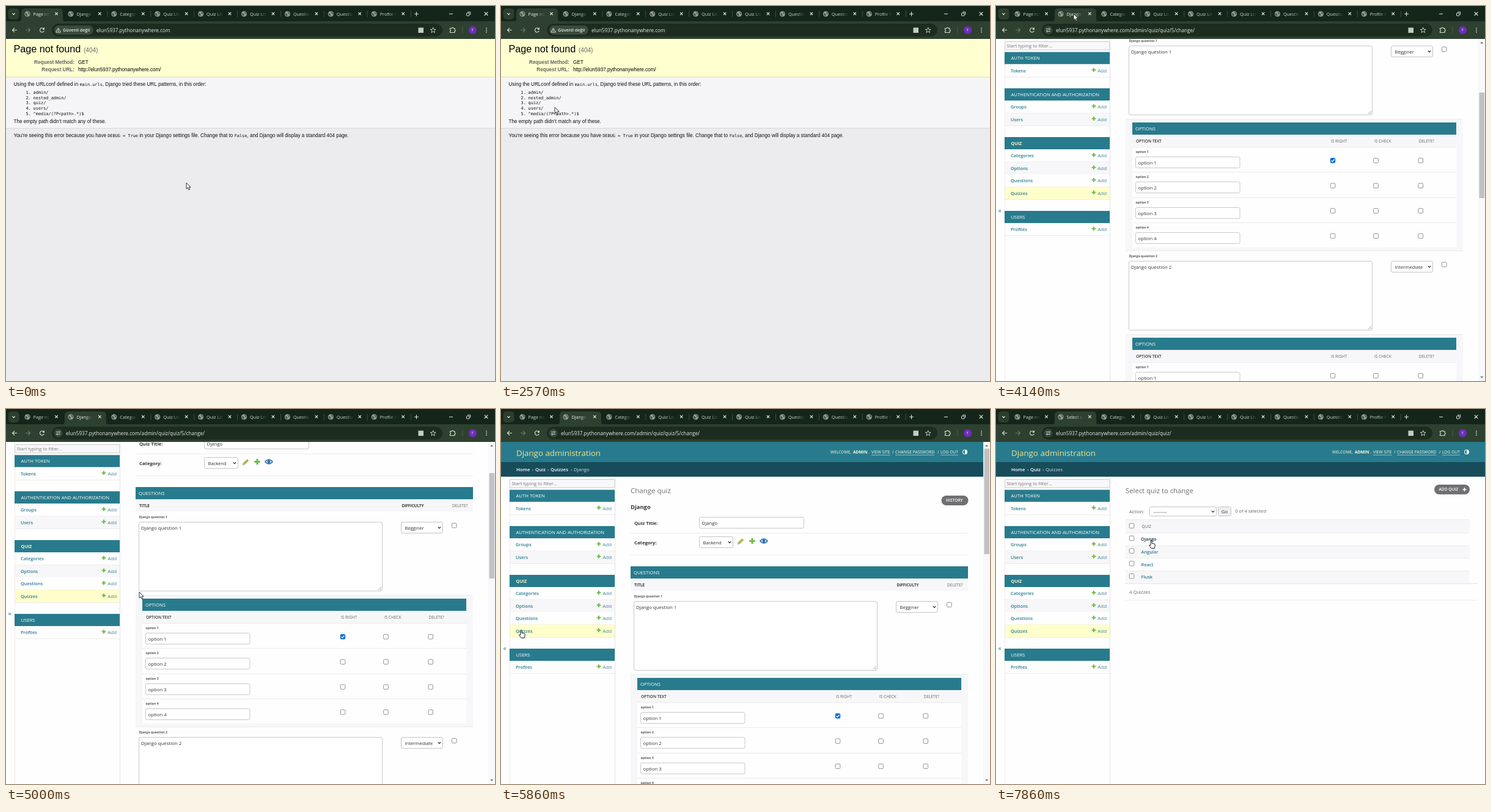
Animation of 800 by 615 pixels, one loop 8000 ms. Source, as an HTML page with a canvas:

```html
<!DOCTYPE html>
<html lang="tr">
<head>
<meta charset="utf-8">
<style>
  html, body { margin: 0; width: 100%; height: 100%; overflow: hidden; background: #fff; }
  canvas { display: block; }
</style>
</head>
<body>
<canvas id="stage" width="800" height="615"></canvas>
<script>
const ctx = document.getElementById('stage').getContext('2d');
const UI = '"Open Sans", "Noto Sans", sans-serif';
const ARIAL = '"Liberation Sans", Arial, sans-serif';
const MONO = '"DejaVu Sans Mono", monospace';
const HOST = 'elun5937.pythonanywhere.com';
const TEAL = '#287b8d', DARK = '#174c5a', LINE = '#ececee', SHADE = '#f7f6f8', INK = '#333', GREY = '#666';

const LOOP = 8000, STEP = 1000 / 7;
const OPEN_ADMIN = 27, OPEN_LIST = 44;
const cursorKeys = [
  [0, 295, 290], [1, 295, 288], [4, 297, 120], [7, 298, 48], [10, 298, 48], [13, 240, 110],
  [16, 92, 150], [18, 88, 166], [20, 60, 150], [22, 52, 130], [24, 112, 40], [27, 127, 13],
  [33, 127, 13], [35, 218, 300], [36, 224, 320], [38, 150, 345], [40, 38, 363], [41, 33, 362],
  [43, 33, 362], [46, 250, 430], [48, 420, 486], [49, 418, 482], [53, 264, 232], [54, 254, 215], [55, 254, 215]
];
const scrollKeys = [[0, 250], [33, 250], [35, 130], [36, 19], [38, 0], [56, 0]];

function track(keys, n) {
  const i = Math.max(1, keys.findIndex(k => k[0] >= n));
  const a = keys[i - 1], b = keys[i], p = (n - a[0]) / (b[0] - a[0]);
  return a.slice(1).map((v, j) => v + (b[j + 1] - v) * p);
}

function rect(x, y, w, h, color) {
  ctx.fillStyle = color;
  ctx.fillRect(x, y, w, h);
}
function box(x, y, w, h, r, fill, border, width = 1) {
  ctx.beginPath();
  ctx.roundRect(x, y, w, h, r);
  if (fill) { ctx.fillStyle = fill; ctx.fill(); }
  if (border) { ctx.strokeStyle = border; ctx.lineWidth = width; ctx.stroke(); }
}
function text(str, x, y, size, color = INK, weight = 400, font = UI, align = 'left') {
  ctx.font = `${weight} ${size}px ${font}`;
  ctx.fillStyle = color;
  ctx.textAlign = align;
  ctx.fillText(str, x, y);
  return ctx.measureText(str).width;
}
function disc(x, y, r, color) {
  ctx.beginPath();
  ctx.arc(x, y, r, 0, 7);
  ctx.fillStyle = color;
  ctx.fill();
}
function stroke(path, x, y, color, width = 1.1) {
  ctx.save();
  ctx.translate(x, y);
  ctx.strokeStyle = color;
  ctx.lineWidth = width;
  ctx.stroke(new Path2D(path));
  ctx.restore();
}
function shape(path, x, y, fill, line, width = 0.9) {
  ctx.save();
  ctx.translate(x, y);
  ctx.fillStyle = fill;
  ctx.fill(new Path2D(path));
  ctx.restore();
  if (line) stroke(path, x, y, line, width);
}
const chevron = (x, y, color = '#222') => stroke('M-2.2-1.1L0 1.1 2.2-1.1', x, y, color, 1.2);
const cross = (x, y, r, color) => stroke(`M${-r} ${-r}L${r} ${r}M${r} ${-r}L${-r} ${r}`, x, y, color);
const plus = (x, y, r, color, width) => stroke(`M${-r} 0H${r}M0 ${-r}V${r}`, x, y, color, width);

// Browser window

function globe(x, y) {
  disc(x, y, 4.6, '#929c93');
  shape('M-3.6-1.5Q-1-1 0 .5T-1 3.6Q-4 2-3.6-1.5ZM.5-3.8Q4-2.6 3.6.8 1.4.6.5-3.8Z', x, y, '#4b584c');
}

function tabs(active, listOpen) {
  rect(0, 0, 800, 26, '#14261a');
  box(3.5, 4, 18, 18, 5, '#2c3e2d');
  chevron(12.5, 13, '#e4ebe4');
  const titles = ['Page not found', listOpen ? 'Select quiz' : 'Django | Change', 'Categories', 'Quiz List',
    'Quiz List', 'Quiz List', 'Question', 'Question', 'Profile Page'];
  titles.forEach((title, i) => {
    const x = 25 + i * 70.9;
    if (i === active) {
      shape('M-5 22Q0 22 0 17V6Q0 0 6 0H62Q68 0 68 6V17Q68 22 73 22Z', x, 4, '#2e402f');
    } else if (i !== active - 1) {
      rect(x + 69.5, 8, 1, 10, '#3d5040');
    }
    globe(x + 10, 13);
    const fade = ctx.createLinearGradient(x + 34, 0, x + 47, 0);
    fade.addColorStop(0, i === active ? '#eaf0ea' : '#cbd6cb');
    fade.addColorStop(1, 'rgba(200,215,200,0)');
    text(title, x + 19.5, 15.7, 7.3, fade);
    cross(x + 57.5, 12.7, 2.2, '#dfe7df');
  });
  plus(671.5, 13, 3.4, '#dfe7df', 1.1);
  rect(725, 12.5, 6, 1, '#e4ebe4');
  box(753.5, 11.5, 4.5, 4.5, 0.8, null, '#e4ebe4');
  stroke('M0 0H4.5V4.5', 755.2, 9.8, '#e4ebe4', 0.9);
  cross(785.5, 12.7, 2.8, '#e4ebe4');
}

function toolbar(admin, path, focused, hovered) {
  const light = '#d5dfd5';
  rect(0, 25, 800, 29, '#2e402f');
  stroke('M4 0H-3.5M0-3.5L-3.5 0 0 3.5', 14, 39.5, light);
  stroke('M-4 0H3.5M0-3.5L3.5 0 0 3.5', 36, 39.5, '#6d7d6e');
  stroke('M3-1.8A3.5 3.5 0 1 0 3.3 1.2M3.4-4V-1.4H.8', 59, 39.5, light);
  box(75, 29, 639, 21, 10.5, hovered && !focused ? '#24362a' : '#1c2c1e');
  if (focused) box(75, 28.8, 638.5, 21.2, 10.6, '#24352a', '#a3d9a5', 1.4);

  if (admin) {
    disc(85.5, 39.5, 7, '#35473a');
    stroke('M-3.5-1.8H.2M-3.5 1.8H-2.4M-.2 1.8H3.5', 85.5, 39.5, light, 1);
    stroke('M3 -1.8A1.1 1.1 0 1 1 .8-1.8 1.1 1.1 0 1 1 3-1.8ZM-.4 1.8A1.1 1.1 0 1 1-2.6 1.8 1.1 1.1 0 1 1-.4 1.8Z', 85.5, 39.5, light, 0.9);
    text(HOST + path, 98, 42.6, 8.2, '#e6ece6');
  } else {
    box(79, 32, 64, 15, 7.5, '#3a4b3c');
    stroke('M0-3.6L4 3.2H-4ZM0-1.4V1M0 1.6V2.4', 85.5, 39.8, '#e6ece6', 0.9);
    text('Güvenli değil', 93, 42.3, 7.1, '#e6ece6', 600);
    const width = text(HOST, 148, 42.6, 8.2, '#e6ece6');
    if (focused) rect(148 + width + 0.5, 34, 1, 11, '#e6ece6');
  }
  if (focused) {
    box(596.5, 33, 68, 14, 7, '#174a29');
    disc(605.5, 40, 4, '#a9e6b1');
    text('Dorvil Scan', 614, 42.6, 7.4, '#b8efbf', 600);
  }
  rect(674.5, 35.5, 8.5, 8.5, '#c3cdc3');
  stroke('M0-4.4L1.2-1.3 4.4-1.2 1.9.9 2.7 4 0 2.2-2.7 4-1.9.9-4.4-1.2-1.2-1.3Z', 698.7, 39.6, light, 0.9);
  stroke('M-4-2.8H-1.3A1.3 1.3 0 0 1 1.3-2.8H3.5V-.6A1.3 1.3 0 0 1 3.5 2V4.2H-4V2A1.5 1.5 0 0 0-4-.8Z', 730.5, 39.3, light, 1.1);
  rect(746.5, 34.5, 1, 10, '#4c5f4d');
  disc(763.5, 39.5, 6.6, '#6c2eb9');
  text('E', 763.5, 41.4, 5, '#fff', 400, UI, 'center');
  for (const dy of [-3.2, 0, 3.2]) disc(786, 39.5 + dy, 0.9, light);
}

// Error page

function richLine(x, y, ...parts) {
  parts.forEach((part, i) => {
    x += i % 2 ? text(part, x, y, 6.9, '#111', 400, MONO) : text(part, x, y, 8.13, '#111', 400, ARIAL);
  });
}

function errorPage() {
  rect(0, 54, 800, 561, '#ecebee');
  rect(0, 54, 800, 62, '#ffffcf');
  rect(0, 116, 800, 1, '#dcdcd4');
  rect(0, 117, 800, 83, '#f5f4f7');
  rect(0, 200, 800, 1, '#d9d9da');
  text('Page not found', 12.5, 75.7, 16.2, '#000', 400, ARIAL);
  text('(404)', 127, 75.7, 10, GREY, 400, ARIAL);
  text('Request Method:', 112, 95, 8.13, GREY, 700, ARIAL, 'right');
  text('Request URL:', 112, 107, 8.13, GREY, 700, ARIAL, 'right');
  text('GET', 118, 95, 8.13, '#000', 400, ARIAL);
  text(`http://${HOST}/`, 118, 107, 8.13, '#000', 400, ARIAL);
  richLine(12.5, 130.8, 'Using the URLconf defined in ', 'main.urls', ', Django tried these URL patterns, in this order:');
  ['admin/', 'nested_admin/', 'quiz/', 'users/', '^media/(?P<path>.*)$'].forEach((pattern, i) => {
    text(`${i + 1}.`, 32.6, 144 + i * 8.7, 6.9, '#111', 400, MONO);
    text(pattern, 44.6, 144 + i * 8.7, 6.9, '#111', 400, MONO);
  });
  richLine(12.5, 192, 'The empty path didn’t match any of these.');
  richLine(12.5, 214.5, 'You’re seeing this error because you have ', 'DEBUG = True',
    ' in your Django settings file. Change that to ', 'False', ', and Django will display a standard 404 page.');
}

// Admin pages

function header(right, crumbs) {
  rect(0, 54, 800, 33, TEAL);
  rect(0, 87, 800, 24, DARK);
  text('Django administration', 25, 77, 13.3, '#f3e08a');
  const links = (str, x, weight) => text(str, right + x, 73, 6.7, '#fdf8d8', weight);
  links('WELCOME,', -220);
  links('ADMIN', -183, 700);
  links('.', -157.5);
  [['VIEW SITE', -153], ['CHANGE PASSWORD', -114], ['LOG OUT', -40]].forEach(([label, x]) => {
    const width = links(label, x);
    rect(right + x, 75, width, 0.8, '#a9cbd2');
  });
  links('/', -119);
  links('/', -45);
  disc(right, 70.5, 4, '#fff');
  shape('M0-3A3 3 0 0 0 0 3Z', right, 70.5, TEAL);
  const spots = [25, 56, 81, 119];
  crumbs.forEach((name, i) => {
    const last = i === crumbs.length - 1;
    text(name, spots[i], 102.2, 7.8, last ? '#cfe0e6' : '#fff', last ? 400 : 600);
    if (i) text('›', spots[i] - 5, 102.2, 7.8, '#cfe0e6');
  });
}

function sidebar() {
  rect(0, 111, 187, 620, '#fefefe');
  rect(14, 111, 1, 620, LINE);
  rect(186, 111, 1, 620, '#e3e3e5');
  text('«', 3.5, 395.5, 11, TEAL);
  box(14.5, 115.5, 171.5, 13.5, 1, '#f8f7f9', '#ccc');
  text('Start typing to filter...', 17.5, 125, 7.6, '#757575');
  const modules = [['AUTH TOKEN', 132.5, 'Tokens'], ['AUTHENTICATION AND AUTHORIZATION', 192, 'Groups', 'Users'],
    ['QUIZ', 272, 'Categories', 'Options', 'Questions', 'Quizzes'], ['USERS', 393, 'Profiles']];
  for (const [title, top, ...models] of modules) {
    rect(14, top, 172, 20, TEAL);
    const current = title === 'QUIZ';
    text(title, 24.5, top + 12.9, current ? 7.2 : 7.7, current ? '#fff6c4' : '#fff', current ? 700 : 400);
    models.forEach((model, i) => {
      const y = top + 20 + i * 20.5;
      rect(15, y, 171, 20.5, model === 'Quizzes' ? '#ffffcc' : i % 2 ? SHADE : '#fefefe');
      rect(15, Math.round(y + 20), 171, 1, LINE);
      text(model, 24, y + 13, 7.4, TEAL, 600);
      plus(160, y + 9.3, 3.3, '#6cbd45', 2);
      text('Add', 166.3, y + 13, 8, '#41849a');
    });
  }
}

function checkbox(x, y, checked) {
  box(x - 3.8, y - 3.8, 7.6, 7.6, 1.4, checked ? '#0b6bd0' : '#fff', checked ? '#0b6bd0' : '#77777a', 0.8);
  if (checked) stroke('M-2.4 0L-.7 1.8 2.5-1.9', x, y, '#fff', 1.3);
}
function field(x, y, w, h, value) {
  box(x + 0.5, y + 0.5, w - 1, h - 1, 2.5, '#fff', '#c9c9cb');
  text(value, x + 4.5, y + 12.8, 7.8);
}
function select(x, y, w, h, value) {
  box(x + 0.5, y + 0.5, w - 1, h - 1, 2.5, '#fff', '#c4c4c6');
  text(value, x + 6.5, y + h / 2 + 3, 7.6);
  chevron(x + w - 6, y + h / 2);
}
function bar(label, x, y, w) {
  rect(x, y, w, 20, TEAL);
  text(label, x + 5, y + 12.9, 7.7, '#fff');
}
function pill(label, x, y, w) {
  box(x, y, w, 16, 8, '#706f72');
  text(label, x + 7.5, y + 10.4, 6.6, '#fff', 600);
}

function question(top, number, difficulty, rightOption) {
  const name = `Django question ${number}`;
  text(name, 217.5, top - 6.5, 5.2, '#555', 700);
  field(217, top, 399, 114, '');
  text(name, 221, top + 12.5, 7.8);
  stroke('M0 5L5 0M3 5L5 3', 609, top + 107, '#888', 0.8);
  select(646, top, 69, 19, difficulty);
  checkbox(733.3, top + 6);

  rect(212, top + 120, 552, 217, SHADE);
  rect(212, top + 120, 552, 1, LINE);
  rect(212, top + 336, 552, 1, LINE);
  bar('OPTIONS', 223, top + 126, 530);
  text('OPTION TEXT', 229, top + 158.5, 6.5, INK, 600);
  text('IS RIGHT', 548, top + 158.5, 6.5, GREY);
  text('IS CHECK', 619, top + 158.5, 6.5, GREY);
  text('DELETE?', 691.5, top + 158.5, 6.5, GREY);
  for (let i = 0; i < 4; i++) {
    const y = top + 166 + i * 41.25, label = `option ${i + 1}`;
    rect(223, y, 530, 41.25, '#fefefe');
    rect(223, Math.round(y), 530, 1, LINE);
    text(label, 228.5, y + 10, 5.2, '#555', 700);
    field(228, Math.round(y + 16), 171.5, 19, label);
    [551, 621.5, 694.7].forEach((x, j) => checkbox(x, y + 22.4, j === 0 && i === rightOption));
  }
}

function changeForm() {
  text('Change quiz', 212, 137.5, 11.5, '#6f6f72');
  pill('HISTORY', 720.5, 142, 44);
  text('Django', 212, 164, 9.4, INK, 700);
  text('Quiz Title:', 218, 190, 7.7, INK, 700);
  field(324, 177, 172, 19, 'Django');
  rect(212, 203, 552, 1, LINE);
  text('Category:', 218, 222, 7.7, INK, 700);
  select(324, 209, 56, 19, 'Backend');
  shape('M-5 5L-4 1.5 2.5-4.5 5-2 -1.5 4Z', 392, 217, '#a6b85a', '#d0b070', 0.7);
  plus(411, 216.5, 4.7, '#6cbd45', 3);
  shape('M-6 0Q0-7 6 0 0 7-6 0Z', 430, 216.5, '#fff', '#2468a8', 1.5);
  disc(430, 216.5, 2.4, '#2468a8');
  rect(212, 239, 552, 1, LINE);
  bar('QUESTIONS', 212, 258, 552);
  rect(212, 278, 552, 20, SHADE);
  text('TITLE', 218, 291, 6.5, INK, 700);
  text('DIFFICULTY', 647.5, 291, 6.4, INK, 700);
  text('DELETE?', 730, 291, 6.5, GREY);
  question(315, 1, 'Begginer', 0);
  question(668, 2, 'Intermediate', -1);
}

function quizList(hovered) {
  text('Select quiz to change', 212, 137.5, 11.3, '#6f6f72');
  pill('ADD QUIZ', 717, 124, 58);
  plus(766.5, 132, 3, '#fff', 1.6);
  text('Action:', 218, 171, 7.7, GREY);
  select(251, 160, 110, 16, '---------');
  box(363.5, 160.5, 21, 15, 2, '#efeff1', '#c8c8ca');
  text('Go', 368.7, 171, 7.8);
  text('0 of 4 selected', 391, 170.3, 7.6, GREY);
  rect(212, 181, 563, 22, SHADE);
  rect(212, 181, 563, 1, LINE);
  checkbox(222, 191.5);
  text('QUIZ', 238.5, 194.7, 6.5, GREY);
  ['Django', 'Angular', 'React', 'Flusk'].forEach((name, i) => {
    const y = 203 + i * 20.7;
    if (i % 2) rect(212, y, 563, 20.7, SHADE);
    rect(212, Math.round(y), 563, 1, LINE);
    checkbox(222, y + 9);
    text(name, 237.5, y + 13.2, 7.4, hovered && !i ? '#10333f' : TEAL, 600);
  });
  rect(212, 286, 576, 1, '#e4e4e6');
  text('4 Quizzes', 218, 302.7, 7.7, GREY);
  rect(212, 313, 576, 1, LINE);
}

function scrollbar(scroll) {
  rect(789, 54, 11, 561, '#f8f7f9');
  rect(790.5, 65 + scroll * 0.308, 8.5, 173, '#c1c0c3');
  shape('M-2.6 1.4L0-1.6 2.6 1.4Z', 794.7, 60, '#77777a');
  shape('M-2.6-1.4L0 1.6 2.6-1.4Z', 794.7, 609, '#77777a');
}

function adminPage(listOpen, scroll, hovered) {
  rect(0, 54, 800, 561, '#fefefe');
  ctx.save();
  ctx.beginPath();
  ctx.rect(0, 54, 800, 561);
  ctx.clip();
  ctx.save();
  ctx.translate(0, -scroll);
  header(listOpen ? 770 : 759, listOpen ? ['Home', 'Quiz', 'Quizzes'] : ['Home', 'Quiz', 'Quizzes', 'Django']);
  if (listOpen) quizList(hovered); else changeForm();
  ctx.restore();
  ctx.translate(0, -Math.min(scroll, 57));
  sidebar();
  ctx.restore();
  if (!listOpen) scrollbar(scroll);
}

function pointer(kind, x, y) {
  if (kind === 'beam') {
    stroke('M-2-5H2M0-5V5M-2 5H2', x + 0.5, y, '#111', 1);
  } else if (kind === 'hand') {
    shape('M-1 1Q0-.5 1 1V5.2L5.2 6.2Q6.5 6.6 6.3 8L5.3 13.5H0L-3.4 8.6Q-3.4 7-1 8.6Z', x, y, '#fff', '#222', 1);
  } else {
    shape('M0 0V10L2.3 7.9 4 11.6 5.7 10.9 4.1 7.3H7.1Z', x, y, '#fff', '#222', 0.9);
  }
}

function draw(time) {
  const n = Math.min(55, Math.floor((time % LOOP + 3) / STEP));
  const [x, y] = track(cursorKeys, n);
  const admin = n >= OPEN_ADMIN, listOpen = n >= OPEN_LIST;
  const focused = n >= 6 && n < 13;
  const overUrl = y > 28 && y < 51;
  const overLink = n >= 40 && n < OPEN_LIST || n >= 54;

  if (admin) adminPage(listOpen, track(scrollKeys, n)[0], n >= 54); else errorPage();
  tabs(admin ? 1 : 0, listOpen);
  toolbar(admin, listOpen ? '/admin/quiz/quiz/' : '/admin/quiz/quiz/5/change/', focused, overUrl);
  pointer(overUrl ? 'beam' : overLink ? 'hand' : 'arrow', x, y);
}

function tick() {
  draw(performance.now());
  requestAnimationFrame(tick);
}
tick();
</script>
</body>
</html>
```
